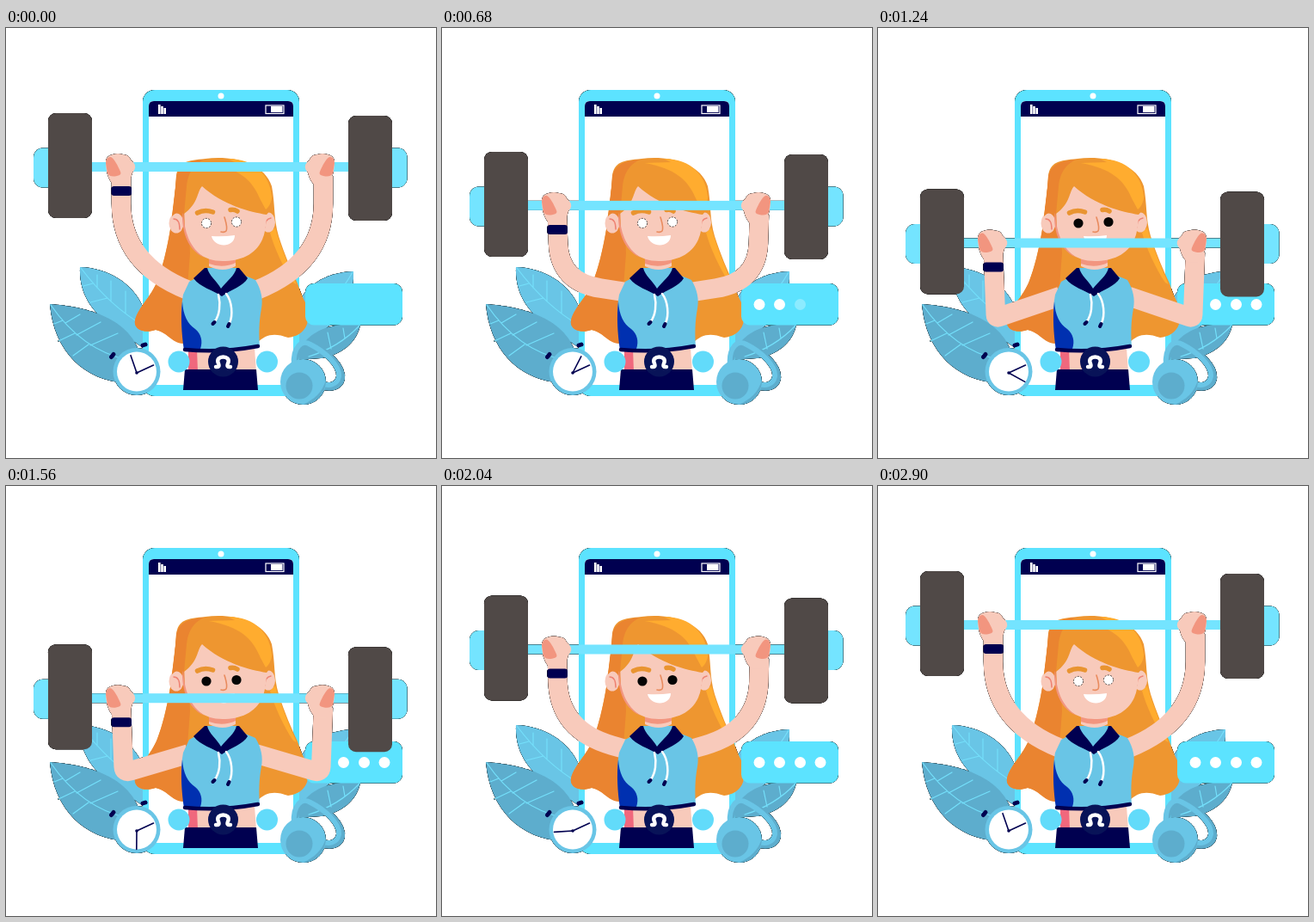
An HTML page for the animation above (2920 ms loop, 500x500 px).

```html
<!DOCTYPE html>
<html lang="en">
<head>
<meta charset="utf-8">
<title>Workout</title>
<style>
html, body { margin: 0; width: 100%; height: 100%; overflow: hidden; background: #fff; }
svg { display: block; width: 500px; height: 500px; }
#scene { filter: drop-shadow(0 0 .5px #000) drop-shadow(0 0 .3px #000); }
.cyan { fill: #5ce3ff; }
.pale { fill: #74e4ff; }
.sky { fill: #69c5e6; }
.teal { fill: #5dadcd; }
.navy { fill: #000050; }
.skin { fill: #f8cabb; }
.blush { fill: #f2957f; }
.hair { fill: #ee9630; }
.hairDark { fill: #ea8430; }
.hairLight { fill: #ffac2f; }
.iron { fill: #504947; }
.white { fill: #fff; }
.line { fill: none; stroke-linecap: round; stroke-linejoin: round; }
.vein { stroke: #74e0fb; stroke-width: 1.2; }
.arm { stroke: #f8cabb; stroke-width: 22.5; stroke-linecap: butt; }
</style>
</head>
<body>
<svg viewBox="0 0 500 500">
<g id="scene">
  <!-- leaves -->
  <path class="sky" d="M86 278C118 279 148 296 160 326V372C128 350 84 330 86 278Z"/>
  <path class="line vein" d="M87 279C106 304 132 330 160 346M106 302V287M122 318V294M139 331V306M101 297L90 300M118 314L98 319"/>
  <path class="teal" d="M51 321C92 324 146 336 157 384L140 413C92 410 56 378 51 321Z"/>
  <path class="line vein" d="M52 322C74 354 104 378 142 386M69 343L86 333M82 357L110 342M98 369L130 355M66 340L56 344M80 355L61 364M96 368L78 381"/>
  <path class="sky" d="M404 283C372 284 344 300 336 330V372C376 350 406 330 404 283Z"/>
  <path class="line vein" d="M403 284C386 314 364 334 340 349"/>
  <path class="teal" d="M412 345C374 342 346 354 336 386L366 384C390 380 408 366 412 345Z"/>
  <path class="line vein" d="M411 346C394 364 372 376 352 382M378 373L374 354M394 361L392 349"/>

  <!-- phone -->
  <rect class="cyan" x="159" y="72" width="182" height="356" rx="14"/>
  <rect class="white" x="166" y="85" width="168" height="330" rx="5"/>
  <path class="navy" d="M166 103V91Q166 85 172 85H328Q334 85 334 91V103Z"/>
  <circle class="white" cx="250" cy="79" r="3.5"/>
  <path class="white" d="M177 89h2.600v11H177ZM180.200 91h2.600v9h-2.600ZM183.400 93h2.600v7h-2.600ZM308 91h13.500v7H308Z"/>
  <rect x="302" y="90" width="21" height="9.500" fill="none" stroke="#fff" stroke-width="1.2"/>

  <!-- long hair -->
  <path class="hair" d="M198 172C200 156 210 154 232 152C262 148 300 156 309 184C313 204 311 222 317 242C324 264 332 282 339 297C342 306 345 314 349 321C356 342 348 358 328 360C312 354 302 356 292 366H205C194 366 188 354 174 351C160 356 148 350 150 340C154 324 168 314 176 294C188 264 196 210 198 172Z"/>
  <path class="hairDark" d="M198 172C202 158 212 155 232 153L212 220L214 262L206 367C192 366 188 354 174 351C160 356 148 350 150 340C154 324 168 314 176 294C188 264 196 210 198 172Z"/>
  <path class="hairLight" d="M313 232C320 256 330 280 338 298L334 296C323 280 312 256 307 238Z"/>

  <!-- message bubble -->
  <rect class="cyan" x="348" y="297" width="113" height="48.500" rx="10"/>
  <g id="dots" class="white">
    <circle cx="369" cy="321.500" r="6.5"/><circle cx="392.500" cy="321.500" r="6.5"/>
    <circle cx="416.500" cy="321.500" r="6.5"/><circle cx="440" cy="321.500" r="6.5"/>
  </g>

  <!-- body -->
  <path class="skin" d="M212 372H289L291 400H212Z"/>
  <path fill="#f0687d" d="M212 373H222L223 400H212Z"/>
  <path id="armL" class="line arm"/>
  <path id="armR" class="line arm" transform="matrix(-1 0 0 1 503 0)"/>
  <path class="sky" d="M213 295C224 289 236 284 251 284C266 284 280 288 290 293C297 304 299 316 297 326C294 342 294 356 295 371L208 375C205 354 202 330 206 310Z"/>
  <path fill="#0030b0" d="M205 318C206 334 211 344 220 350C227 356 229 364 226 373L207 375C204 354 203 336 205 318Z"/>
  <path class="line" d="M208 374Q250 378 293 370" stroke="#000050" stroke-width="4.500"/>
  <path class="navy" d="M208 397H291L293 421H206Z"/>
  <path class="navy" d="M231 279H271L281 291C276 300 262 304 251 312C240 304 226 302 218 291Z"/>
  <path class="sky" d="M234 279H268C266 288 257 294 250 303C245 294 236 288 234 279Z"/>
  <path class="skin" d="M236 258H267V277Q252 285 236 277Z"/>
  <path class="blush" d="M236 266Q252 274 267 266V273Q252 280 236 274Z"/>
  <path class="line" d="M247 310C250 322 248 334 243 341M256 309C263 318 264 334 260 343" stroke="#fff" stroke-width="2.500"/>
  <path class="line" d="M242.500 342L240.500 344M259.500 344L258 347" stroke="#000050" stroke-width="4"/>

  <!-- head -->
  <ellipse class="skin" cx="198" cy="227" rx="8.5" ry="11.500"/>
  <ellipse class="skin" cx="305" cy="226" rx="8" ry="11.500"/>
  <path class="line" d="M195 222Q202 222 202 234M308 221Q301 222 301 232" stroke="#ee8272" stroke-width="1.5"/>
  <path class="skin" d="M206 180H302C304 210 304 232 298 246C290 264 272 271 252 271C230 271 212 258 208 236Z"/>
  <path class="blush" d="M206 212C207 238 214 256 231 267C214 260 206 242 205 222Z"/>
  <path class="hair" d="M198 180C202 154 226 152 258 152C290 154 306 172 309 194C310 204 308 212 303 217C284 214 252 206 228 184C222 190 224 204 207 216C202 213 197 214 193 219Z"/>
  <path class="hairDark" d="M198 176C201 158 212 155 230 153C220 158 212 166 210 184L207 216C202 213 197 214 193 219Z"/>
  <path class="hairLight" d="M258 152C290 152 307 172 309 196C309 202 306 208 302 211L296 200C286 176 272 164 236 157L266 156Z"/>
  <path class="line" d="M222.500 215C228 212 235 212 240.500 214M261 211.500Q265 210.500 269 213" stroke="#e99430" stroke-width="5.500"/>
  <g id="eyes" stroke="#222" stroke-dasharray="2 1.5">
    <ellipse cx="233" cy="227" rx="5.600"/><ellipse cx="268" cy="225.500" rx="5.600"/>
  </g>
  <path class="line" d="M254 220C256 227 258 232 256 236Q254 238 250 237" stroke="#e98b5e" stroke-width="1.6"/>
  <path class="white" d="M239 242Q252 243 266 241C266 256 242 256 239 242Z"/>

  <!-- phone controls -->
  <circle cx="201" cy="388" r="12.500" fill="#62dbfa"/>
  <circle cx="303.500" cy="388" r="12.500" fill="#62dbfa"/>
  <circle cx="252.500" cy="388" r="17.500" fill="#081358"/>
  <path class="line" d="M244 394Q249 395 247 390C242 380 263 380 258 390Q256 395 261 394" stroke="#fff" stroke-width="4.400"/>

  <!-- stopwatch -->
  <path class="line" d="M122.500 382.500L125 379.500M159 369L162 368" stroke="#000050" stroke-width="5"/>
  <circle class="sky" cx="152" cy="399.500" r="27.500"/>
  <circle class="white" cx="152" cy="399.500" r="23"/>
  <path class="line" d="M152 401L171.500 392" stroke="#000050" stroke-width="1.6"/>
  <path id="hand" class="line" d="M152 401V379.500" stroke="#000050" stroke-width="1.6"/>
  <circle class="navy" cx="152" cy="401" r="1.8"/>

  <!-- kettlebell -->
  <path class="line" d="M337 394C334 374 346 362 357 369C374 377 392 394 390 408C388 417 378 420 366 416" stroke="#5dadcd" stroke-width="8"/>
  <path class="line" d="M335 392C333 372 344 361 354 368C370 376 388 392 387 405C385 415 376 417 366 413" stroke="#69c5e6" stroke-width="6"/>
  <circle class="sky" cx="345.500" cy="411.500" r="26.500"/>
  <path class="teal" d="M345 438C360 438 372 426 372 409C368 424 358 432 345 438Z"/>
  <circle class="teal" cx="341" cy="416" r="15.500"/>

  <!-- barbell, fists and wristband -->
  <g id="barbell">
    <rect class="pale" x="32" y="139.500" width="34" height="46" rx="11"/>
    <rect class="pale" x="432" y="139.500" width="34.500" height="46" rx="11"/>
    <rect class="pale" x="98" y="156" width="302" height="11"/>
    <rect class="iron" x="49" y="99" width="51" height="122" rx="9"/>
    <rect class="iron" x="398" y="102" width="51" height="122" rx="9"/>
    <g id="fist">
      <path class="skin" d="M116 155Q117 148 124 147Q130 145 136 147Q143 147 145 153L148 156Q153 162 147 168Q145 178 138 184H126C118 176 116 165 116 155Z"/>
      <path class="blush" d="M116 157Q117 149 122 150C126 152 130 160 133 167Q135 171 129 172Q121 174 118 169Z"/>
    </g>
    <use href="#fist" transform="matrix(-1 0 0 1 498 0)"/>
    <rect class="navy" x="122.500" y="184" width="23.500" height="11" rx="3"/>
  </g>
</g>
</svg>
<script>
const LOOP = 2920, DEPTH = 89;
const $ = id => document.getElementById(id);
const clamp = x => Math.min(1, Math.max(0, x));
const ramp = (t, from, to) => clamp((t - from) / (to - from));
const ease = x => (1 - Math.cos(Math.PI * x)) / 2;
const mix = (a, b, k) => a + (b - a) * k;

// The elbow is a corner whose rounding tightens as the bar comes down.
function armPath(p) {
  const round = 1 - .95 * p ** 1.4;
  const elbowX = 134 + 3 * Math.min(1, p * 3), elbowY = 274 + 64 * p ** 1.6;
  const shoulderX = 212, shoulderY = 305 + 7 * p * p;
  const wristY = 172 + DEPTH * p;
  return `M134 ${wristY}L${mix(elbowX, 134, round)} ${elbowY - 70 * round}` +
    `Q${elbowX} ${elbowY} ${mix(elbowX, shoulderX, round)} ${mix(elbowY, shoulderY, round)}` +
    `L${shoulderX} ${shoulderY}`;
}

function draw(t) {
  const p = clamp(ease(ramp(t, 55, 1300)) - ease(ramp(t, 1430, 2420)));
  $('barbell').setAttribute('transform', `translate(0 ${DEPTH * p})`);
  for (const id of ['armL', 'armR']) $(id).setAttribute('d', armPath(p));

  $('hand').setAttribute('transform', `rotate(${360 * ease(t / LOOP) - 19} 152 401)`);
  [...$('dots').children].forEach((dot, i) =>
    dot.setAttribute('opacity', ramp(t, 80 + 280 * i, 220 + 280 * i)));

  const dark = t >= 1100 && t < 2300;
  const open = 1 - ramp(t, 2190, 2270) + ramp(t, 2330, 2410);
  $('eyes').setAttribute('fill', dark ? '#050505' : '#fff');
  $('eyes').setAttribute('stroke-width', dark ? 0 : .8);
  $('eyes').setAttribute('visibility', open > .02 ? 'visible' : 'hidden');
  for (const eye of $('eyes').children) eye.setAttribute('ry', 5.6 * open);
}

function frame() {
  draw(performance.now() % LOOP);
  requestAnimationFrame(frame);
}
frame();
</script>
</body>
</html>
```
